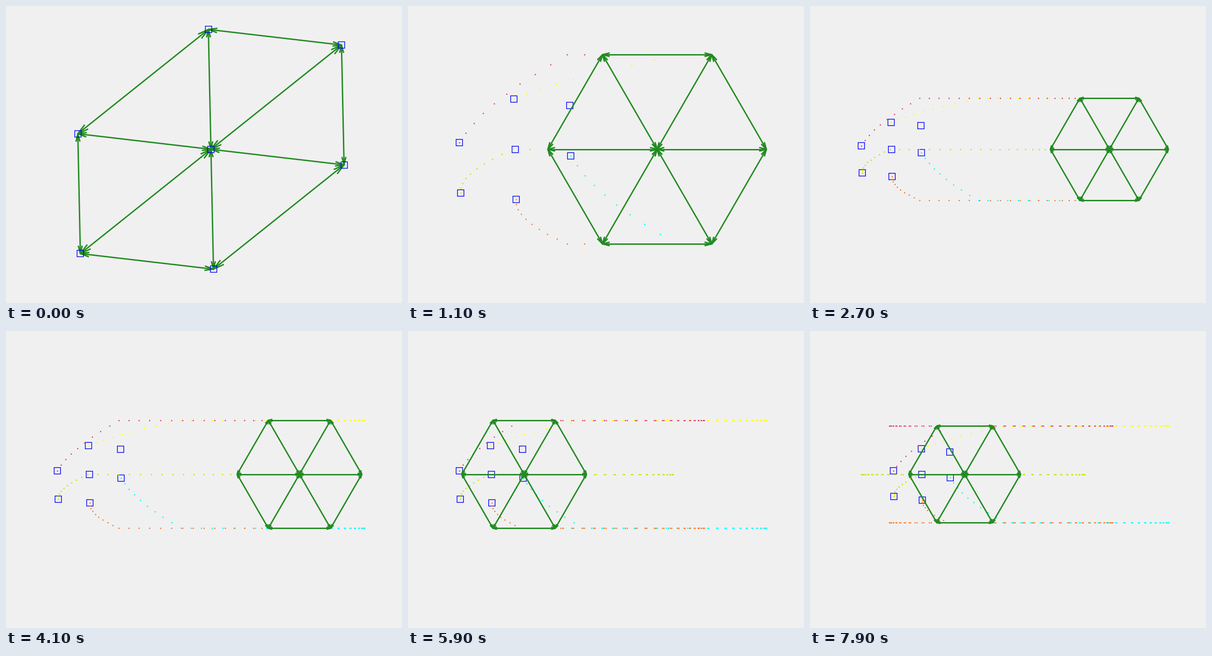
Write a matplotlib script that moves like this. It is 864x648 px and loops after 8 s.

```python
import numpy as np
import matplotlib.pyplot as plt
from matplotlib.animation import FuncAnimation
from matplotlib.collections import LineCollection

W, H, DPI = 864, 648, 100
PX = 72 / DPI                       # points per pixel
FRAMES, STEP_MS = 80, 100
SETTLE = 9                          # steps until the hexagon is formed
BOX_W, BOX_H = 0.775 * W, 0.815 * H
CX, CY = 0.5175 * W, 0.4825 * H

# Start offsets from the centre agent, in hexagon sides
a = np.array([0.5097, -0.0595])
b = np.array([-0.0098, 0.4589])
START = np.array([-a, b, a + b, a, -b, -a - b, 0 * a])
angle = np.radians([120, 60, 0, -60, -120, 180])
GOAL = np.vstack([np.column_stack([np.cos(angle), np.sin(angle)]), [[0, 0]]])

EDGES = [(i, (i + 1) % 6) for i in range(6)] + [(6, i) for i in range(6)]
TRAILS = [(1, "#ffff00"), (3, "#00ffff"), (0, "#e04a80"),
          (4, "#ff7d33"), (5, "#c3e600")]


def leader(k):
    """Horizontal position of the centre agent: a slow sine sweep."""
    w, peak = 0.088, 32.42
    return 2 * (np.cos(w * (k - peak)) - np.cos(w * peak))


def agents(k):
    s = min(k / SETTLE, 1)
    return (1 - s) * START + s * GOAL + [leader(k), 0]


PATH = np.array([agents(k) for k in range(FRAMES)])


def heads(nodes):
    """Open arrow heads at both ends of every edge."""
    out = []
    for i, j in EDGES:
        for p, q in ((nodes[i], nodes[j]), (nodes[j], nodes[i])):
            d = 0.066 * (q - p)
            side = 0.25 * np.array([-d[1], d[0]])
            out.append([q - d + side, q, q - d - side])
    return np.array(out)


def fit(points):
    """Equal-aspect tight view: returns a map from world to pixels."""
    lo, hi = points.min(axis=0), points.max(axis=0)
    scale = min(BOX_W / (hi[0] - lo[0]), BOX_H / (hi[1] - lo[1]))
    mid = (lo + hi) / 2
    return lambda p: (np.asarray(p) - mid) * [scale, -scale] + [CX, CY]


fig = plt.figure(figsize=(W / DPI, H / DPI), dpi=DPI, facecolor="#f0f0f0")
ax = fig.add_axes([0, 0, 1, 1])
ax.set_xlim(0, W)
ax.set_ylim(H, 0)
ax.axis("off")

dots = [ax.plot([], [], "o", ms=3 * PX, mew=0, color=c, zorder=2)[0]
        for _, c in TRAILS]
squares, = ax.plot([], [], "s", ms=14 * PX, mew=1.5 * PX, mfc="none",
                   mec="#0000ff", zorder=1)
style = dict(colors="#228b22", linewidths=3 * PX, joinstyle="round", zorder=3)
shafts = ax.add_collection(LineCollection([], **style), autolim=False)
tips = ax.add_collection(LineCollection([], **style), autolim=False)


def draw(k):
    nodes = PATH[k]
    wings = heads(nodes)
    trails = [PATH[:k + 1, i] for i, _ in TRAILS]
    view = fit(np.vstack([START, nodes, wings.reshape(-1, 2), *trails]))

    for dot, trail in zip(dots, trails):
        dot.set_data(*view(trail).T)
    squares.set_data(*view(START).T)
    squares.set_zorder(4 if k == 0 else 1)
    shafts.set_segments([view(nodes[[i, j]]) for i, j in EDGES])
    tips.set_segments(list(view(wings)))
    return [*dots, squares, shafts, tips]


anim = FuncAnimation(fig, draw, frames=FRAMES, interval=STEP_MS,
                     init_func=lambda: draw(0), repeat=True, repeat_delay=0)
plt.show()
```
